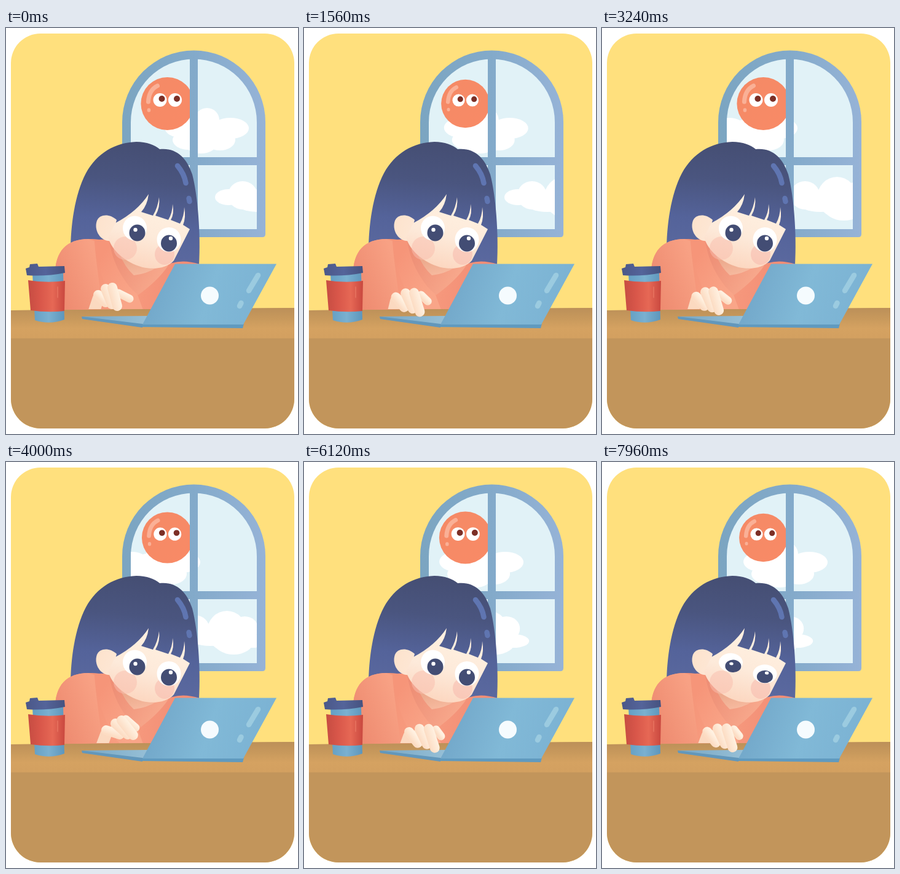
An HTML page with a canvas for the animation above (8 s loop, 475 by 660 pixels).

```html
<!DOCTYPE html>
<html lang="en">
<head>
<meta charset="utf-8">
<title>Working by the window</title>
<style>
html, body { margin: 0; width: 100%; height: 100%; overflow: hidden; background: #fff; }
canvas { display: block; }
</style>
</head>
<body>
<canvas id="stage" width="475" height="660"></canvas>
<script>
const ctx = document.getElementById('stage').getContext('2d');
const LOOP = 8000, TAU = Math.PI * 2;

const mix = (a, b, k) => a + (b - a) * k;
const ease = k => 0.5 - 0.5 * Math.cos(Math.PI * Math.min(1, Math.max(0, k)));

function grad(x0, y0, x1, y1, ...colors) {
  const g = ctx.createLinearGradient(x0, y0, x1, y1);
  colors.forEach((c, i) => g.addColorStop(i / (colors.length - 1), c));
  return g;
}
function shape(d, fill) {
  ctx.fillStyle = fill;
  ctx.fill(new Path2D(d));
}
function oval(x, y, rx, ry, fill) {
  ctx.fillStyle = fill;
  ctx.beginPath();
  ctx.ellipse(x, y, rx, ry, 0, 0, TAU);
  ctx.fill();
}
function line(d, width, color) {
  ctx.lineWidth = width;
  ctx.lineCap = 'round';
  ctx.strokeStyle = color;
  ctx.stroke(new Path2D(d));
}

const GLASS = 'M203,327 V153 A102.5,102.5 0 0 1 408,153 V327 Z';
const FRAME = 'M189,153 A116.5,116.5 0 0 1 422,153 V335 Q422,340 417,340 H194 Q189,340 189,335 Z';

// Cloud lobes: x from the cloud's reference edge, y, rx, ry
const HIGH_CLOUD = [
  [-111, 162, 26, 16], [-30, 163, 30, 17], [-68, 150, 20, 20], [-70, 169, 46, 22],
  [-98, 182, 26, 16], [-78, 186, 27, 18], [-47, 182, 25, 17]
];
const LOW_CLOUD = [
  [22, 275, 22, 13], [45, 272, 24, 23], [97, 275, 32, 33], [126, 271, 22, 20],
  [138, 291, 25, 11], [70, 283, 38, 16], [108, 292, 32, 21]
];
const drawCloud = (lobes, x) => lobes.forEach(([dx, y, rx, ry]) => oval(x + dx, y, rx, ry, '#fff'));

function drawSun(t) {
  const r = 41.2 + 1.9 * Math.cos(TAU * (t - 100) / 3200);
  ctx.save();
  ctx.beginPath();
  ctx.rect(203, 50, 96, 160);
  ctx.clip();
  ctx.translate(262.5, 123);
  ctx.scale(r / 43, r / 43);
  oval(0, 0, 43, 43, grad(-30, -30, 30, 30, '#f58a66', '#f88a66'));
  line('M-31,-3 Q-30,-22 -16,-29', 7, '#fab096');
  line('M-30,10 V11', 5.5, '#fab096');
  for (const x of [-12, 12.5]) {
    oval(x, -6, 11, 11, '#fff');
    oval(x + 3, -8, 5, 5, '#7c2f26');
  }
  ctx.restore();
}

function drawWindow(t) {
  const metal = grad(189, 190, 422, 190, '#7ba5c1', '#83aaca', '#96b3d7');
  shape(FRAME, metal);
  shape(GLASS, '#e1f2f7');
  ctx.save();
  ctx.clip(new Path2D(GLASS));
  const high = t < 3700 ? mix(395, 315, ease(t / 3700)) : mix(315, 367, ease((t - 3700) / 3400));
  drawCloud(HIGH_CLOUD, high);
  drawCloud(LOW_CLOUD, mix(340, 180, ease(t / 8150)));
  drawSun(t);
  ctx.restore();
  ctx.fillStyle = metal;
  ctx.fillRect(299, 45, 13, 285);
  ctx.fillRect(200, 210, 211, 13);
}

function drawHair() {
  shape('M105,365 C105,320 112,270 130,236 C148,203 178,186 212,185 C229,185 242,190 250,197 ' +
    'C276,194 294,210 303,238 C312,272 317,335 314,385 L105,385 Z',
    grad(225, 185, 205, 380, '#454e73', '#4a557f', '#54639a', '#5b699f'));
  line('M279,224 Q290,237 292.5,252', 8.5, '#5f75b1');
  line('M297.5,277 L298.5,282', 8.5, '#5f75b1');
}

function drawShirt() {
  shape('M80,400 C80,364 98,343 134,343 C150,343 160,345 172,346 L215,395 L270,382 ' +
    'Q290,376 315,384 L268,458 L85,458 Z', grad(85, 390, 290, 420, '#f18b70', '#f89d80', '#f28d75'));
  shape('M80,400 C80,364 98,343 134,343 L144,346 C146,380 153,420 157,458 L85,458 Z',
    grad(85, 430, 158, 400, '#ee8b70', '#f8a184'));
  shape('M144,345 Q158,342 172,346 C174,380 190,415 213,431 L223,458 H185 C160,425 149,390 144,345 Z',
    grad(150, 380, 215, 420, '#f69579', '#f9a588'));
  shape('M168,347 C174,383 190,412 215,434 Q248,410 264,386 L230,388 Z',
    grad(175, 370, 245, 410, '#ee8f76', '#f7a78b'));
  shape('M184,366 Q194,390 208,402 Q228,400 246,389 Z', grad(205, 375, 212, 402, '#ecaa8d', '#f6b99e'));
}

function drawEye(x, y, px, py, hx, hy, s) {
  ctx.save();
  ctx.translate(x, y);
  ctx.rotate(0.13 * (1 - s));
  ctx.scale(1, s);
  oval(0, -2, 19.5, 20, '#fff');
  oval(px, py, 13, 13.5, '#434d74');
  oval(hx, hy, 3.2, 3.2, '#fff');
  ctx.restore();
}

function drawFace(t) {
  shape('M180,312 C169,302 153,302 148,313 C142,330 155,348 171,346 Z',
    grad(146, 320, 180, 330, '#fde3cd', '#fde7d5'));
  shape('M178,317 Q214,298 232,270 Q230,288 220,299 L239,305 Q247,292 249,275 Q251,292 243,305 ' +
    'L264,312 Q271,300 271,286 Q274,302 268,312 L283,318 Q290,306 290,291 Q293,308 288,320 L299,327 ' +
    'L273,378 C262,391 240,393 222,389 C194,381 172,362 166,340 Z',
    grad(242, 285, 215, 390, '#fff0e0', '#fdeada', '#fcd6bf'));
  oval(194, 358, 19, 19, 'rgba(249,190,174,.5)');
  ctx.save();
  ctx.clip(new Path2D('M225,300 L299,327 L273,378 L260,392 L225,392 Z'));
  oval(258, 368, 16, 17, 'rgba(248,182,170,.5)');
  ctx.restore();
  const gap = Math.min(...[2640, 5440, 8240].map(b => Math.abs(t - b)));
  const open = Math.min(1, 0.1 + 0.9 * gap / 380);
  drawEye(209.5, 327.5, 4, 5.5, 1, 0.5, open);
  drawEye(265, 346, 0, 4, 3, -4, open);
}

function drawDesk() {
  shape('M8,459 L469,455 V652 H8 Z', '#c2955b');
  shape('M8,459 L469,455 V504.5 H8 Z', grad(0, 457, 0, 504, '#bd9159', '#c8995c', '#d5a261', '#d3a060'));
}

function drawCup() {
  shape('M43,399 L93,398 L95,474 Q71,483 47,475 Z', grad(44, 0, 95, 0, '#649fc4', '#7ab0d0', '#5d96bc'));
  shape('M36,410 Q66,415 96,411 L95,460 Q68,463 40,459 Z',
    grad(36, 0, 96, 0, '#c64c42', '#d9574a', '#e66855', '#c9483f'));
  line('M84,421 V438', 1.5, 'rgba(240,130,108,.65)');
  shape('M39,384 L51,383 L53,388 L95,387 L96,398 Q66,404 34,402 L32,391 L38,389 Z',
    grad(33, 0, 96, 0, '#4b5889', '#54649a', '#46527f'));
}

function drawLaptop() {
  shape('M123,469 L232,468 L222,484 Z', grad(125, 0, 230, 0, '#78a7c4', '#96bfd6'));
  shape('M123,469 L222,481 V487 L124,473 Z', '#6297bb');
}
function drawScreen() {
  shape('M222,481 H387 L385,488 L222,486 Z', '#609abf');
  shape('M275,383.5 H440 L386,482 H222 Z', grad(240, 400, 425, 460, '#72a7c9', '#81b9d7', '#7bb2d3'));
  oval(331.5, 435, 14.5, 14.5, '#f5fbfe');
  line('M410,402 L395,427', 8.5, '#9bcbe0');
  line('M382.5,447 L380,452', 8.5, '#9bcbe0');
}

// Finger segments [x0, y0, x1, y1] for the raised, resting and pressing hand
const HAND = {
  up: [[148, 436, 170, 443], [163, 425, 183, 443], [173, 420, 192, 444], [180, 418, 196, 432]],
  rest: [[150, 434, 162, 446], [162, 424, 172, 449], [173, 422, 181, 452], [183, 431, 201, 440]],
  down: [[145, 439, 159, 457], [162, 434, 174, 459], [177, 434, 187, 465], [189, 435, 197, 446]]
};
const CYCLE = 1760;
const PRESS = [[0, 0], [80, 0.05], [480, -1], [800, 1], [920, 0.92], [1240, -0.6], [1560, 0.72], [CYCLE, 0]];

function pressAt(p) {
  const i = PRESS.findIndex(k => k[0] > p);
  const [a, b] = [PRESS[i - 1], PRESS[i]];
  return mix(a[1], b[1], ease((p - a[0]) / (b[0] - a[0])));
}

function drawHand(t) {
  const p = t % CYCLE, press = pressAt(p);
  const shift = 13 - 13 * Math.cos(TAU * p / CYCLE);
  const to = press < 0 ? HAND.up : HAND.down;
  const fingers = HAND.rest.map((f, i) => f.map((v, j) => mix(v, to[i][j], Math.abs(press))));
  const [wx, wy] = fingers[0];

  ctx.save();
  ctx.beginPath();
  ctx.rect(100, 380, 180, 77);
  ctx.clip();
  line(`M${142 + shift * 0.85},464 L${wx + shift},${wy + 6}`, 19, '#fbd9c0');
  ctx.restore();

  ctx.save();
  ctx.translate(shift, 0);
  shape(`M${fingers.map(f => `${f[0]},${f[1]}`).join('L')}L${fingers[2][2]},${fingers[2][3] - 6}` +
    `L${fingers[0][2]},${fingers[0][3]}Z`, '#fde4ce');
  [3, 0, 1, 2].forEach(i => {
    const [x0, y0, x1, y1] = fingers[i];
    const nx = (y1 - y0) / 4, ny = (x0 - x1) / 4;
    const tone = grad(x0 - nx, y0 - ny, x0 + nx, y0 + ny, '#fcdcc3', '#fff1e1');
    line(`M${x0},${y0} L${x1},${y1}`, i === 3 ? 13 : 16, tone);
  });
  ctx.restore();
}

function draw(t) {
  ctx.fillStyle = '#fff';
  ctx.fillRect(0, 0, 475, 660);
  ctx.save();
  ctx.beginPath();
  ctx.roundRect(8, 9, 461, 642, 48);
  ctx.clip();
  ctx.fillStyle = '#ffe07d';
  ctx.fillRect(8, 9, 461, 642);
  drawWindow(t);
  drawHair();
  drawShirt();
  drawFace(t);
  drawDesk();
  drawCup();
  drawLaptop();
  drawHand(t);
  drawScreen();
  ctx.restore();
}

const start = performance.now();
function tick() {
  draw((performance.now() - start) % LOOP);
  requestAnimationFrame(tick);
}
tick();
</script>
</body>
</html>
```
